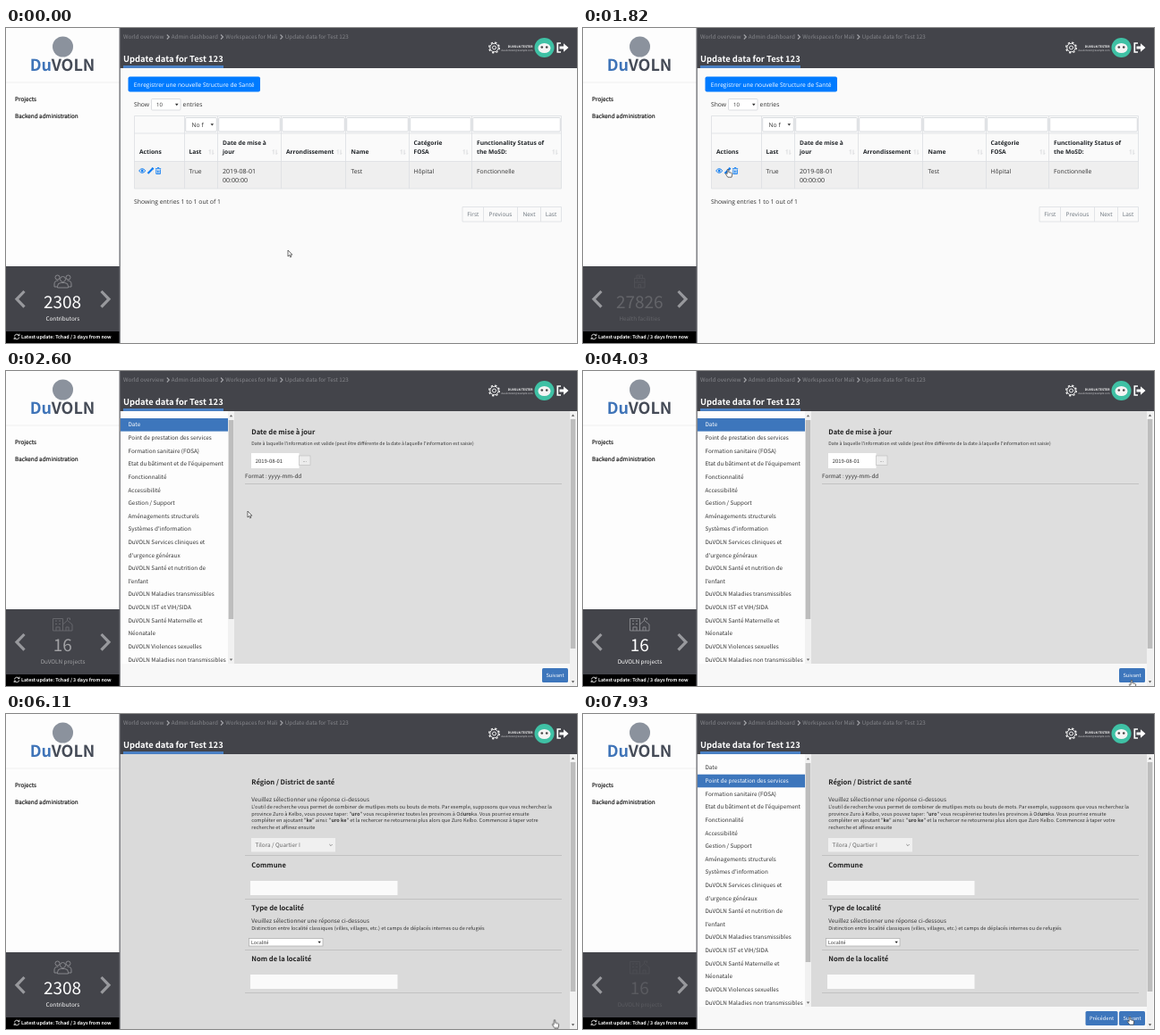
Recreate the animation shown at these times as an HTML page. Size 638 px wide and 353 px high, loop 8000 ms.

```html
<!DOCTYPE html>
<html lang="fr">
<head>
<meta charset="utf-8">
<title>Update data</title>
<style>
html, body { margin: 0; width: 100%; height: 100%; overflow: hidden; background: #fafafa; }
svg { display: block; width: 638px; height: 353px; }
text { font: 6.35px "Noto Sans CJK JP", "Noto Sans CJK SC", "Noto Sans CJK", "Open Sans", sans-serif; fill: #333; text-rendering: geometricPrecision; white-space: pre; }
.b { font-weight: 700; }
.mid { text-anchor: middle; }
.end { text-anchor: end; }
.w, .w text { fill: #fff; }
.crumb text { font-size: 6.3px; fill: #85868b; }
.nav text { fill: #222; stroke: #222; stroke-width: .2px; }
.num { font-size: 19px; }
.table text { font-family: "Open Sans", "Noto Sans", sans-serif; font-size: 6.75px; }
.table .head text { font-weight: 700; font-size: 6.65px; fill: #212529; }
.table .pages text { font-size: 6.5px; fill: #6c757d; text-anchor: middle; }
.table .date { font-size: 7.1px; }
.h { font-size: 7.6px; font-weight: 700; fill: #222; }
.s text { font-size: 5.55px; }
.btn text { font-size: 5.7px; fill: #fff; text-anchor: middle; }
.line { fill: none; stroke: #dcdfe2; stroke-width: .8; }
.rule { stroke: #bcbcbc; stroke-width: .8; }
.icon { fill: none; stroke: #8f9095; stroke-width: .9; stroke-linejoin: round; }

.a { animation: 8s step-end infinite; }
#table { animation-name: table; }
#date { animation-name: date; }
#place { animation-name: place; }
#panel { animation-name: panel; }
#people { animation-name: people; }
#sites { animation-name: sites; }
#jobs { animation-name: jobs; }
#cursor { animation-name: move; }
#arrow { animation-name: arrow; }
#hand { animation-name: hand; }
@keyframes table { 0% { opacity: 1 } 26%, 100% { opacity: 0 } }
@keyframes date { 0% { opacity: 0 } 26% { opacity: 1 } 76.375%, 100% { opacity: 0 } }
@keyframes place { 0% { opacity: 0 } 76.375%, 100% { opacity: 1 } }
@keyframes panel { 0% { opacity: 0 } 27.625% { opacity: 1 } 76.375% { opacity: 0 } 78%, 100% { opacity: 1 } }
@keyframes people {
  0% { opacity: 1 } 19.5% { opacity: .5 } 21.125% { opacity: 0 }
  58.5% { opacity: .2 } 60.125% { opacity: .5 } 63.375% { opacity: .85 } 66.625% { opacity: .95 } 69.875% { opacity: 1 }
  82.875% { opacity: .2 } 84.5%, 100% { opacity: 0 }
}
@keyframes sites {
  0% { opacity: 0 } 22.75% { opacity: .17 } 26% { opacity: 1 } 30.875% { opacity: .3 } 32.5% { opacity: 0 }
  84.5% { opacity: 1 } 99.125%, 100% { opacity: 0 }
}
@keyframes jobs {
  0% { opacity: 0 } 32.5% { opacity: .5 } 35.75% { opacity: 1 }
  53.625% { opacity: .6 } 55.25% { opacity: .3 } 56.875% { opacity: .1 } 58.5% { opacity: 0 }
  99.125%, 100% { opacity: .12 }
}
@keyframes move {
  0% { transform: translate(315px, 249px) }
  1.25% { transform: translate(315px, 249px); animation-timing-function: steps(7, start) }
  11.25% { transform: translate(168px, 166px); animation-timing-function: steps(4, start) }
  17.875% { transform: translate(162px, 158px) }
  27.625% { transform: translate(200px, 162px) }
  30.875% { transform: translate(270px, 157px) }
  35.75% { transform: translate(369px, 152px) }
  39% { transform: translate(369px, 152px); animation-timing-function: steps(7, start) }
  50.375% { transform: translate(613px, 346px) }
  53.625% { transform: translate(613px, 346px); animation-timing-function: steps(5, start) }
  61.75% { transform: translate(613px, 342.5px) }
  87.75% { transform: translate(612px, 340.5px) }
  91%, 100% { transform: translate(611px, 339px) }
}
@keyframes arrow { 0% { opacity: 1 } 13% { opacity: 0 } 27.625% { opacity: 1 } 50.375%, 100% { opacity: 0 } }
@keyframes hand { 0% { opacity: 0 } 13% { opacity: 1 } 26% { opacity: 0 } 50.375%, 100% { opacity: 1 } }
</style>
</head>
<body>
<svg viewBox="0 0 638 353">
  <rect width="638" height="353" fill="#fafafa"/>

  <!-- record table -->
  <g id="table" class="table a">
    <rect x="136.5" y="54.5" width="147.5" height="17" rx="2" fill="#007bff"/>
    <text x="142.8" y="65.6" class="w" style="font-size:6.65px">Enregistrer une nouvelle Structure de Santé</text>
    <text x="143" y="87.8">Show</text>
    <text x="197.6" y="87.8">entries</text>
    <rect x="162.5" y="79.5" width="32.5" height="12.5" rx="1" fill="#fff" stroke="#d3d6da" stroke-width=".8"/>
    <text x="168" y="87.9" style="font-size:6px">10</text>
    <path d="M189 84.8h3.6l-1.8 2.4z" fill="#333"/>
    <rect x="143.5" y="149.5" width="477" height="30.5" fill="#efefef"/>
    <path class="line" d="M143.5 98.5h477v81.500h-477zM143.500 118h477M143.500 149.500h477M199.500 98.500v81.500M236.500 98.500v81.500M307.500 98.500v81.500M379.500 98.500v81.500M450.500 98.500v81.500M520.500 98.500v81.500"/>
    <g id="filters" fill="#fff" stroke="#cfd2d6" stroke-width=".8"></g>
    <text x="207.500" y="110.700">No f</text>
    <path d="M228.500 107.200h3.600l-1.800 2.400z" fill="#333"/>
    <g class="head">
      <text x="149" y="141.300">Actions</text>
      <text x="204.500" y="141.300">Last</text>
      <text x="242" y="131.300">Date de mise à</text>
      <text x="242" y="141.300">jour</text>
      <text x="313" y="141.300">Arrondissement</text>
      <text x="385.500" y="141.300">Name</text>
      <text x="455.500" y="131.300">Catégorie</text>
      <text x="455.500" y="141.300">FOSA</text>
      <text x="526" y="131.300">Functionality Status of</text>
      <text x="526" y="141.300">the MoSD:</text>
    </g>
    <g id="sorts" fill="none" stroke="#cdcfd2" stroke-width=".7"></g>
    <g fill="none" stroke="#0b7bf2" stroke-width="1">
      <path d="M148.600 160q3.600-4.600 7.200 0q-3.600 4.600-7.200 0z"/>
      <circle cx="152.200" cy="160" r="1" fill="#0b7bf2"/>
      <path d="M158.500 163l5-5" stroke-width="2.200"/>
      <path d="M163.300 158.200l1.300-1.300" stroke-width="2.400"/>
      <path d="M167 157.700h6.200M169 156.600h2.200M167.800 158.500v5h4.600v-5M169.400 159.500v3M170.900 159.500v3" stroke-width=".9"/>
    </g>
    <text x="204.500" y="162.500">True</text>
    <text x="242" y="162.500" class="date">2019-08-01</text>
    <text x="242" y="172.500" class="date">00:00:00</text>
    <text x="385.500" y="162.500">Test</text>
    <text x="455.500" y="162.500">Hôpital</text>
    <text x="526" y="162.500">Fonctionnelle</text>
    <text x="143" y="196.800" style="font-size:6.85px">Showing entries 1 to 1 out of 1</text>
    <path class="line" d="M510 200.500h110.500v16.500h-110.500zM533.500 200.500v16.500M571.500 200.500v16.500M597.500 200.500v16.500"/>
    <g class="pages">
      <text x="521.800" y="211.400">First</text>
      <text x="552.500" y="211.400">Previous</text>
      <text x="584.500" y="211.400">Next</text>
      <text x="609" y="211.400">Last</text>
    </g>
  </g>

  <!-- form, first page -->
  <g id="date" class="a">
    <rect x="128" y="45" width="502" height="308" fill="#dedede"/>
    <text x="274.300" y="70.700" class="h">Date de mise à jour</text>
    <text x="274.300" y="83.200" style="font-size:5.18px">Date à laquelle l'information est valide (peut être différente de la date à laquelle l'information est saisie)</text>
    <rect x="274" y="92" width="53.500" height="17" fill="#fff"/>
    <text x="278.800" y="102.800" style="font-size:5.9px">2019-08-01</text>
    <text x="267" y="120.300">Format : yyyy-mm-dd</text>
    <path class="rule" d="M267 126.500h354"/>
  </g>

  <!-- form, second page -->
  <g id="place" class="a">
    <rect x="128" y="45" width="502" height="308" fill="#dadada"/>
    <text x="274.300" y="79" class="h">Région / District de santé</text>
    <text x="274.300" y="97.800">Veuillez sélectionner une réponse ci-dessous</text>
    <g class="s">
      <text x="274.300" y="106">L'outil de recherche vous permet de combiner de mutlipes mots ou bouts de mots. Par exemple, supposons que vous recherchez la</text>
      <text x="274.300" y="113.700">province Zuro à Kelbo, vous pouvez taper: "<tspan class="b">uro</tspan>" vous recupèreriez toutes les provinces à Od<tspan class="b">uro</tspan>ka. Vous pourriez ensuite</text>
      <text x="274.300" y="121.400">compléter en ajoutant "<tspan class="b">ke</tspan>" ainsi: "<tspan class="b">uro ke</tspan>" et la rechercer ne retournerai plus alors que Zuro Kelbo. Commencez à taper votre</text>
      <text x="274.300" y="129.100">recherche et affinez ensuite</text>
      <text x="274.300" y="242">Distinction entre localité classiques (villes, villages, etc.) et camps de déplacés internes ou de refugiés</text>
    </g>
    <rect x="274" y="139" width="94" height="15.500" fill="#f0f0f0"/>
    <text x="278.500" y="149.300" style="fill:#666">Tilora / Quartier I</text>
    <path d="M361.300 146l1.700 1.700l1.700-1.700" fill="none" stroke="#777" stroke-width=".8"/>
    <text x="274.300" y="171.700" class="h">Commune</text>
    <rect x="273" y="187" width="164.500" height="16" fill="#fafafa"/>
    <text x="274.300" y="219.800" class="h">Type de localité</text>
    <text x="274.300" y="233.800">Veuillez sélectionner une réponse ci-dessous</text>
    <rect x="271.500" y="251.500" width="82.500" height="8.500" fill="#fff" stroke="#aaa" stroke-width=".7"/>
    <text x="274" y="257.700" style="font-size:5.300px">Localité</text>
    <path d="M348.500 254.700h3.400l-1.700 2.400z" fill="#222"/>
    <text x="274.300" y="276.900" class="h">Nom de la localité</text>
    <rect x="273" y="292" width="164.500" height="16" fill="#fafafa"/>
    <path class="rule" d="M267 158.500h354M267 207.500h354M267 264.500h354M267 312.500h354"/>
  </g>

  <g id="panel" class="a">
    <rect x="128" y="45" width="120" height="283" fill="#fdfdfd"/>
    <g id="menu"></g>
    <rect x="248" y="45" width="7" height="283" fill="#f1f1f1"/>
    <rect x="248.700" y="55" width="5.600" height="223" fill="#bdbdbd"/>
    <path d="M249.800 51.300h3.400l-1.700-2.200zM249.800 322.500h3.400l-1.700 2.200z" fill="#666"/>
    <rect x="128" y="328" width="502" height="25" fill="#f8f8f8"/>
    <g class="btn">
      <rect x="599" y="333" width="29" height="16" rx="1.500" fill="#3d76bc"/>
      <text x="613.500" y="343.100">Suivant</text>
    </g>
    <g id="date" class="a">
      <rect x="128" y="53" width="120" height="14.600" fill="#3d76bc"/>
      <text x="136.500" y="62.400" class="w">Date</text>
      <rect x="327.500" y="95" width="12.500" height="10.500" fill="#ececec" stroke="#bbb" stroke-width=".6"/>
      <text x="333.800" y="101.500" class="mid" style="font-size:5px">...</text>
    </g>
    <g class="a btn" style="animation-name:place">
      <rect x="128" y="67.700" width="120" height="14.600" fill="#3d76bc"/>
      <text x="136.500" y="77" style="font-size:6.350px;text-anchor:start">Point de prestation des services</text>
      <rect x="561.500" y="333" width="36" height="16" rx="1.500" fill="#3d76bc"/>
      <text x="579.500" y="343.100">Précédent</text>
    </g>
  </g>

  <!-- page scrollbar -->
  <g class="a" style="animation-name:bar">
    <rect x="630" y="45" width="7" height="308" fill="#f1f1f1"/>
    <rect x="630.700" y="54" width="5.600" height="257" fill="#bdbdbd"/>
    <path d="M631.800 50.800h3.400l-1.700-2.200zM631.800 347.300h3.400l-1.700 2.200z" fill="#555"/>
  </g>

  <!-- header -->
  <rect x="127" width="511" height="45" fill="#43444a"/>
  <g class="crumb">
    <text x="131" y="12.200">World overview</text>
    <text x="184.700" y="12.200">Admin dashboard</text>
    <text x="245.300" y="12.200">Workspaces for Mali</text>
    <text x="311.800" y="12.200">Update data for Test 123</text>
    <path d="M179.800 7.500l2.500 2.500l-2.500 2.500M240 7.500l2.500 2.500l-2.500 2.500M306.500 7.500l2.500 2.500l-2.500 2.500" fill="none" stroke="#a5a6aa" stroke-width="1.100"/>
  </g>
  <text x="131" y="38.400" class="b w" style="font-size:9.400px">Update data for Test 123</text>
  <rect x="131" y="42" width="112" height="3" fill="#4a80c4"/>
  <g fill="none" stroke="#f0f0f0">
    <circle cx="545.500" cy="22" r="4.700"/>
    <circle cx="545.500" cy="22" r="5.800" stroke-width="1.400" stroke-dasharray="2.280"/>
    <circle cx="545.500" cy="22" r="2"/>
  </g>
  <text x="588.500" y="21.700" class="b w end" style="font-size:3.400px">DUVOLN TESTER</text>
  <text x="588.500" y="26.200" class="end" style="font-size:2.700px;fill:#d5d5d8">duvolntester@example.com</text>
  <circle cx="601.500" cy="22" r="11" fill="#3fc1a5"/>
  <ellipse cx="601.500" cy="22.500" rx="7" ry="5.500" fill="#f4f4f4"/>
  <circle cx="598.800" cy="21.500" r="1.300" fill="#444"/>
  <circle cx="604.200" cy="21.500" r="1.300" fill="#444"/>
  <path d="M620 17h-3.700v10h3.700" fill="none" stroke="#fff" stroke-width="1.700"/>
  <path d="M618.500 20.500h4.500v-3.300l5.500 4.800l-5.500 4.800v-3.300h-4.500z" fill="#fff"/>

  <!-- sidebar -->
  <rect width="127" height="353" fill="#fdfdfd"/>
  <path d="M0 61h127" stroke="#efefef"/>
  <circle cx="63.500" cy="21" r="11.500" fill="#8b929d"/>
  <text x="63" y="48" class="b mid" style="font-size:18px;fill:#454b57"><tspan fill="#3f74b8">Du</tspan>VOLN</text>
  <g class="nav">
    <text x="10" y="82.300">Projects</text>
    <text x="10" y="101.300">Backend administration</text>
  </g>
  <rect y="267" width="127" height="73.500" fill="#43444a"/>
  <rect y="340" width="127" height="13" fill="#000"/>
  <path d="M20.500 295l-8.500 8.800l8.500 8.800M106.500 295l8.500 8.800l-8.500 8.800" fill="none" stroke="#98999d" stroke-width="3.200"/>
  <g id="people" class="a w">
    <g class="icon">
      <circle cx="63.500" cy="281.500" r="3"/>
      <path d="M57.500 291v-1.500q0-4 4-4h4q4 0 4 4v1.500z"/>
      <circle cx="57.500" cy="279.500" r="2.500"/>
      <circle cx="69.500" cy="279.500" r="2.500"/>
      <path d="M57 290h-3v-3q0-4 4.500-4M70 290h3v-3q0-4-4.500-4"/>
    </g>
    <text x="63" y="313.500" class="num mid">2308</text>
    <text x="63.300" y="328.300" class="mid">Contributors</text>
  </g>
  <g id="sites" class="a w">
    <path class="icon" d="M57.500 280.500h11.500v10.500h-11.500zM60 280.500v-3.500h6.500v3.500M63.200 277.800v2M62.200 278.800h2M57.500 285h11.500M62 291v-3.500h2.500v3.500M60 282.800h1.500M65 282.800h1.500"/>
    <text x="63.300" y="313.500" class="num mid">27826</text>
    <text x="63.300" y="328.300" class="mid">Health facilities</text>
  </g>
  <g id="jobs" class="a w">
    <path class="icon" d="M52.500 277.500h11v13.500h-11zM55 280h2M59 280h2M55 283.500h2M59 283.500h2M56 291v-4h4v4M63.500 284l5-4.500l5.500 4.500v7h-10.500M67 291v-4h3v4M68.500 279.500v-2.500h3v2"/>
    <text x="63.300" y="313.500" class="num mid">16</text>
    <text x="63.500" y="328.300" class="mid">DuVOLN projects</text>
  </g>
  <path d="M9.500 345.500a2.700 2.700 0 0 1 5-1M14.700 346.500a2.700 2.700 0 0 1-5 1M15 342.700v2h-2M9.200 349.200v-2h2" fill="none" stroke="#fff" stroke-width=".8"/>
  <text x="17" y="348.400" class="b w" style="font-size:5.250px">Latest update: Tchad / 3 days from now</text>
  <rect x="126.500" width="1.300" height="353" fill="#6a6b70"/>

  <g id="cursor" class="a" fill="#fff" stroke="#333" stroke-width=".7" stroke-linejoin="round">
    <path id="arrow" class="a" d="M0 0v7l1.600-1.500l1.100 2.400l1.100-.5l-1.100-2.300h2.200z"/>
    <path id="hand" class="a" d="M-.8.700q.8-1 1.600 0v3l3 .7q1 .3.900 1.500l-.6 3.300h-4.300l-2.600-3.700q.3-1.200 2 0z"/>
  </g>
</svg>
<style>
@keyframes bar { 0% { opacity: 0 } 26%, 100% { opacity: 1 } }
#panel #date { animation-name: date; }
</style>
<script>
const NS = "http://www.w3.org/2000/svg";
function add(parent, tag, attrs, text) {
  const el = document.createElementNS(NS, tag);
  for (const k in attrs) el.setAttribute(k, attrs[k]);
  if (text) el.textContent = text;
  document.getElementById(parent).append(el);
}

const cols = [199.5, 236.5, 307.5, 379.5, 450.5, 520.5, 620.5];
cols.slice(1).forEach((right, i) => {
  const left = cols[i];
  add("filters", "rect", { x: left + 1.2, y: 100.5, width: right - left - 2.4, height: 15.5, rx: 1 });
  const x = right - 8.5;
  add("sorts", "path", { d: `M${x} 141.500v-5l-1.200 1.300M${x + 3} 136.500v5l1.200-1.300` });
});

const items = [
  "Date", "Point de prestation des services", "Formation sanitaire (FOSA)",
  "Etat du bâtiment et de l'équipement", "Fonctionnalité", "Accessibilité",
  "Gestion / Support", "Aménagements structurels", "Systèmes d'information",
  "DuVOLN Services cliniques et", "d'urgence généraux", "DuVOLN Santé et nutrition de",
  "l'enfant", "DuVOLN Maladies transmissibles", "DuVOLN IST et VIH/SIDA",
  "DuVOLN Santé Maternelle et", "Néonatale", "DuVOLN Violences sexuelles",
  "DuVOLN Maladies non transmissibles"
];
items.forEach((s, i) => add("menu", "text", { x: 136.5, y: 62.4 + 14.62 * i }, s));
</script>
</body>
</html>
```
